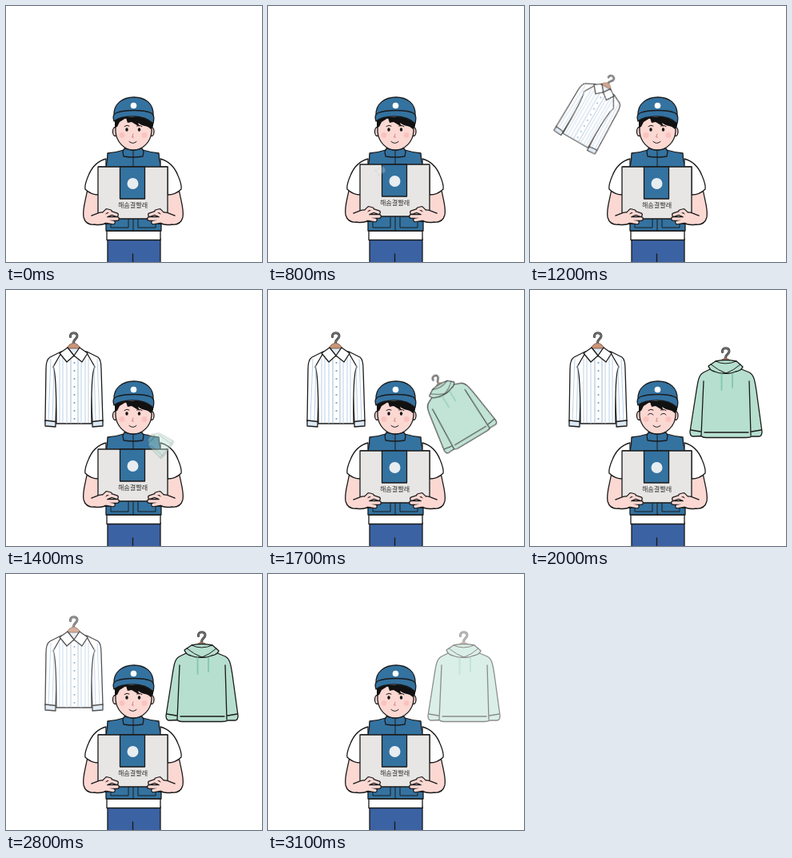
Write an HTML page that moves like this. It is 320 by 320 pixels and loops after 3200 ms.

```html
<!DOCTYPE html>
<html lang="ko">
<head>
<meta charset="utf-8">
<title>Laundry delivery</title>
<style>
html, body { margin: 0; height: 100%; overflow: hidden; background: #fff; }
svg { display: block; width: 100%; height: 100%; }
.ink { stroke: #1a1a1a; stroke-width: 1.3; stroke-linejoin: round; stroke-linecap: round; }
.line { fill: none; }
.thin { stroke-width: 1; }
.blue { fill: #3472a0; }
.skin { fill: #fcd8d3; }
.white { fill: #fff; }
.mint { fill: #b6dfcf; }
.round { fill: none; stroke-linecap: round; stroke-linejoin: round; }
.brand { font: 300 8.1px "Noto Sans CJK KR", "Noto Sans CJK", sans-serif; fill: #333; text-anchor: middle; }

.lift, .shirt, .hoodie, .open, .smile { animation: 3200ms step-end infinite; }
.lift { animation-name: lift; }
.shirt { animation-name: shirt; }
.hoodie { animation-name: hoodie; }
.open { animation-name: open; }
.smile { animation-name: smile; }

@keyframes lift {
  0%, 34.375%, 50%, 100% { transform: translateY(0); }
  25%, 40.625% { transform: translateY(-3px); animation-timing-function: steps(3); }
}
@keyframes shirt {
  0% { opacity: 0; transform: translate(142px, 205px) rotate(60deg) scale(.12); }
  25% { opacity: .3; transform: translate(142px, 205px) rotate(60deg) scale(.12); animation-timing-function: steps(4); }
  37.5% { opacity: .85; transform: translate(79px, 128px) rotate(30deg) scale(.82); }
  40.625% { opacity: 1; transform: translate(83px, 114px) rotate(8deg) scale(.97); }
  43.75% { opacity: 1; transform: translate(84px, 111px) rotate(0deg) scale(1); }
  84.375% { opacity: 1; transform: translate(84px, 111px) rotate(0deg) scale(1); animation-timing-function: steps(4); }
  96.875%, 100% { opacity: 0; transform: translate(84px, 111px) rotate(0deg) scale(1); }
}
@keyframes hoodie {
  0% { opacity: 0; transform: translate(175px, 205px) rotate(-60deg) scale(.12); }
  40.625% { opacity: .3; transform: translate(175px, 205px) rotate(-60deg) scale(.12); animation-timing-function: steps(4); }
  53.125% { opacity: .85; transform: translate(231px, 146px) rotate(-31deg) scale(.83); }
  56.25% { opacity: 1; transform: translate(243px, 130px) rotate(-8deg) scale(.97); }
  59.375% { opacity: 1; transform: translate(245px, 127px) rotate(0deg) scale(1); }
  90.625% { opacity: 1; transform: translate(245px, 127px) rotate(0deg) scale(1); animation-timing-function: steps(3); }
  100% { opacity: .25; transform: translate(245px, 127px) rotate(0deg) scale(1); }
}
@keyframes open { 0%, 75%, 100% { opacity: 1; } 62.5% { opacity: 0; } }
@keyframes smile { 0%, 75%, 100% { opacity: 0; } 62.5% { opacity: 1; } }
</style>
</head>
<body>
<svg viewBox="0 0 320 320">
  <defs>
    <path id="arm" class="ink skin" d="M102 228C100 242 95 254 97 264C99 272 106 274 113 273L130 272V226Z"/>
    <path id="sleeve" class="ink white" d="M125 191C114 194 107 202 103 212C100 219 98 224 99 229C103 233 109 236 116 236V201H125Z"/>
    <path id="fingers" class="round" d="M119 263L126 256L130 257M120 264L132 259L138 261M120 266L139 266M120 268L134 270.500"/>
    <g id="hand">
      <use href="#fingers" stroke="#1a1a1a" stroke-width="5.800"/>
      <path class="ink skin" d="M107 262C112 261 116 257 121 258L127 263L126 270C122 274 116 274 110 273"/>
      <use href="#fingers" stroke="#fcd8d3" stroke-width="3.400"/>
    </g>
    <path id="hook" class="round" d="M-4 5.500C-5 -.5 4.500 -1 4.500 4.500C4.500 8.500 0 8 0 13"/>
    <g id="hanger">
      <use href="#hook" stroke="#444" stroke-width="3"/>
      <use href="#hook" stroke="#999" stroke-width=".9"/>
      <path d="M-8 20Q-7 15 0 13Q7 15 8 20Z" fill="#c99579" stroke="#6b4b3d" stroke-width=".8"/>
    </g>
  </defs>

  <!-- trousers and vest -->
  <path class="ink" fill="#3b62a2" d="M127 291H193V324H127Z"/>
  <path class="ink line" d="M158.500 310V320"/>
  <path class="ink white" d="M126 281H193V292.500H126Z"/>
  <path class="ink skin" d="M149 170H168V184H149Z"/>
  <path class="ink blue" d="M127 184Q138 183 147 180H171Q181 183 191 184Q191 193 194 201V281H125V201Q127 193 127 184Z"/>
  <path class="ink blue" d="M146 182L148 178Q159 182 170 178L172 182L171 188Q159 190 147 188Z"/>
  <path class="ink line thin" d="M159 181V281M131 264V277H153V264M165 264V277H187V264"/>

  <g class="lift">
    <use href="#arm"/>
    <use href="#arm" transform="matrix(-1 0 0 1 318 0)"/>
  </g>
  <use href="#sleeve"/>
  <use href="#sleeve" transform="matrix(-1 0 0 1 318 0)"/>

  <!-- parcel -->
  <g class="lift">
    <path class="ink" fill="#e7e6e4" d="M115 201H202V266H115Z"/>
    <path class="ink blue" d="M142.500 201H173.500V241H142.500Z"/>
    <circle cx="158.500" cy="222" r="7" fill="#e8edf0"/>
    <text class="brand" x="158.500" y="251.500">해솜결빨래</text>
    <use href="#hand"/>
    <use href="#hand" transform="matrix(-1 0 0 1 318 0)"/>
  </g>

  <!-- head -->
  <ellipse class="ink skin" cx="136.500" cy="157" rx="3" ry="5.500"/>
  <ellipse class="ink skin" cx="182" cy="157" rx="3" ry="5.500"/>
  <path class="ink skin" d="M137 140V157C138 170 148 180 159 180C171 180 181 170 182 157V140Z"/>
  <circle cx="145" cy="161.500" r="3.500" fill="#fac3be"/>
  <circle cx="173" cy="161.500" r="3.500" fill="#fac3be"/>
  <path d="M136 139V152L139 151L142 145L150 140L152 146L157 145L167 151L165 146C171 151 177 149 181 154L184 150V139Z" fill="#111"/>
  <g class="ink line thin">
    <path d="M148 150.500Q151 148 154 150M163.500 150Q167 148 170 150.500"/>
    <path d="M159 160L157.500 164H159.500" stroke="#c9877c"/>
    <path d="M154 169.500Q158.500 173.500 163 169.500"/>
  </g>
  <g class="open" fill="#111">
    <ellipse cx="151" cy="154.500" rx="1.700" ry="2.200"/>
    <ellipse cx="166.500" cy="154.500" rx="1.700" ry="2.200"/>
  </g>
  <path class="ink line thin smile" d="M147.500 156Q150.500 152.500 154 156M163.500 156Q167 152.500 170 156"/>
  <path class="ink blue" d="M135 137C134 122 146 114 160 114C174 114 185 122 184 137Z"/>
  <path class="ink blue" d="M135 144C133 139 134 135 138 133.500C148 129.500 172 129.500 181 133.500C186 136 185 141 184 147C177 140 167 138 158 138C148 138 140 140 135 144Z"/>
  <circle cx="159.500" cy="124.500" r="3.800" fill="#fff"/>

  <!-- striped shirt -->
  <g class="shirt"><g transform="translate(-84 -111)">
    <path class="ink white" d="M69 77L55 84Q50 87 50 99L49 164L62 165L64 104Z"/>
    <path class="ink white" d="M101 77L115 84Q119 87 119 99L121 164L108 165L105 104Z"/>
    <path class="ink white" d="M70 77L59 96Q63 104 63 167H107Q106 104 111 96L100 77Z"/>
    <g fill="none" stroke="#b3cbe6" stroke-width=".9">
      <path d="M67 86V166M71 84V166M76 90V167M94 90V167M99 84V166M103 86V166"/>
      <path d="M56 86L53 163M60 94L58 163M114 86L117 163M110 94L112 163"/>
    </g>
    <path d="M81 86V167M90 86V167" stroke="#8fabc8" stroke-width=".8"/>
    <path d="M85.500 91V162" stroke="#6e9fcb" stroke-width="2.200" stroke-linecap="round" stroke-dasharray="0 10"/>
    <path class="ink" fill="#dce8f4" d="M49 163L62 164.500V171L49 170ZM121 163L108 164.500V171L121 170Z"/>
    <path class="ink" fill="#e3ecf5" d="M77 72Q84 69 92 72L85 83Z"/>
    <use href="#hanger" x="84.500" y="53"/>
    <path class="ink white" d="M77 72L85 82L76 90L67 79ZM92 72L102 79L95 90L85 82Z"/>
  </g></g>

  <!-- hoodie -->
  <g class="hoodie"><g transform="translate(-245 -127)">
    <use href="#hanger" x="244.500" y="72"/>
    <path class="ink mint" d="M227 98L217 103C211 106 210 113 208 126L200 177Q200 183 204 183L214 182.500Q216 184.500 220 184.500H270Q275 184.500 277 183L286 183Q290 183 290 177L283 126C281 113 280 106 274 103L262 98Z"/>
    <path class="ink line" d="M217 114L214 182M274 114L276 182M218 178H273M201 175L213 177M277 177L289 175"/>
    <path class="ink mint" d="M232 89Q244 86 258 89L266 96Q264 101 257 102Q250 105 245 104Q238 105 231 102Q225 101 223 95Z"/>
    <path class="ink line thin" d="M226 93Q236 101 245 104Q254 101 263 93M232 89Q244 95 258 89"/>
    <path class="round" d="M239.500 105V125M253 105V122" stroke="#84c8ab" stroke-width="1.800"/>
  </g></g>
</svg>
</body>
</html>
```
